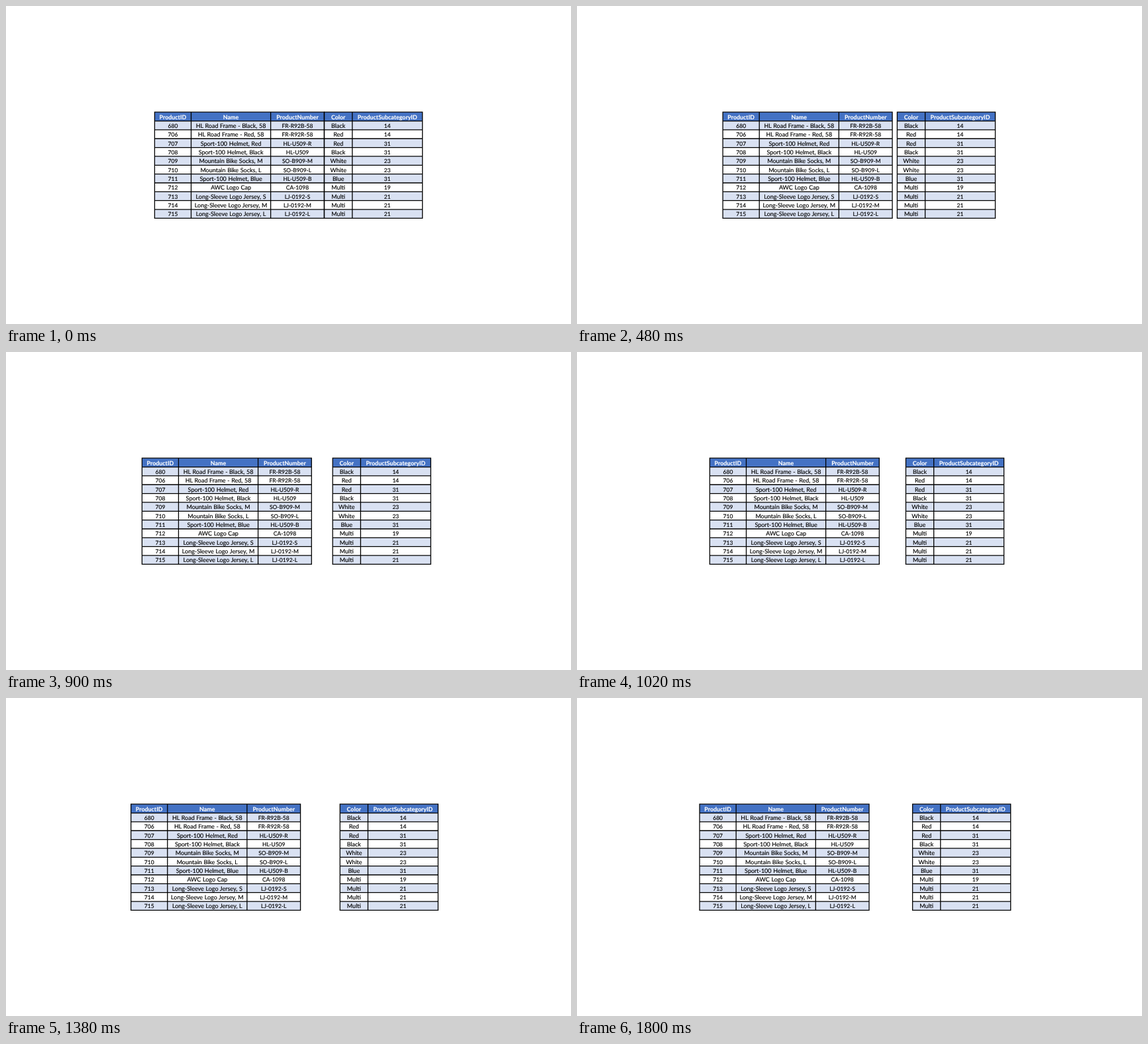
An HTML page that plays this animation: 853 px wide and 480 px high, repeating every 1.86 s.

```html
<!DOCTYPE html>
<html lang="en">
<head>
<meta charset="utf-8">
<title>Table split</title>
<style>
  html, body { margin: 0; width: 100%; height: 100%; overflow: hidden; background: #fff; }
  svg { display: block; }
  path { fill: none; stroke: #000; stroke-width: 1.3; stroke-linecap: square; }
  text {
    font: 9px Lato, Carlito, sans-serif;
    word-spacing: .3px;
    text-anchor: middle;
    text-rendering: geometricPrecision;
    fill: #000;
    stroke: #000;
    stroke-width: .15px;
  }
  .code { font-size: 8.5px; }
  .head { font-size: 8.9px; font-weight: bold; fill: #fff; stroke: #fff; }
</style>
</head>
<body>
<svg id="stage" width="853" height="480" viewBox="0 0 853 480"></svg>
<script>
const LOOP = 1860, STEP = 60, START = 30, END = 1800;
const TOP = 160.2, PITCH = 13.35, BASELINE = 10.4;

const rows = [
  'ProductID|Name|ProductNumber|Color|ProductSubcategoryID',
  '680|HL Road Frame - Black, 58|FR-R92B-58|Black|14',
  '706|HL Road Frame - Red, 58|FR-R92R-58|Red|14',
  '707|Sport-100 Helmet, Red|HL-U509-R|Red|31',
  '708|Sport-100 Helmet, Black|HL-U509|Black|31',
  '709|Mountain Bike Socks, M|SO-B909-M|White|23',
  '710|Mountain Bike Socks, L|SO-B909-L|White|23',
  '711|Sport-100 Helmet, Blue|HL-U509-B|Blue|31',
  '712|AWC Logo Cap|CA-1098|Multi|19',
  '713|Long-Sleeve Logo Jersey, S|LJ-0192-S|Multi|21',
  '714|Long-Sleeve Logo Jersey, M|LJ-0192-M|Multi|21',
  '715|Long-Sleeve Logo Jersey, L|LJ-0192-L|Multi|21'
].map(row => row.split('|'));

function add(parent, tag, attrs, text = '') {
  const node = document.createElementNS('http://www.w3.org/2000/svg', tag);
  for (const key in attrs) node.setAttribute(key, attrs[key]);
  node.textContent = text;
  return parent.appendChild(node);
}

const lineY = i => TOP + i * PITCH;

function rowFill(i) {
  if (i === 0) return '#4472c4';
  return i % 2 ? '#d9e1f2' : '#fff';
}

function textClass(i, value) {
  if (i === 0) return 'head';
  return /^\d+$|^[A-Z]{2}-/.test(value) ? 'code' : 'body';
}

function buildTable(edges, firstCol) {
  const group = add(document.getElementById('stage'), 'g', {});
  const left = edges[0], right = edges[edges.length - 1];
  const width = right - left;

  rows.forEach((row, i) =>
    add(group, 'rect', { x: left, y: lineY(i), width, height: PITCH, fill: rowFill(i) }));

  let grid = '';
  for (let i = 0; i <= rows.length; i++) grid += `M${left} ${lineY(i)}H${right}`;
  for (const x of edges) grid += `M${x} ${TOP}V${lineY(rows.length)}`;
  add(group, 'path', { d: grid });

  rows.forEach((row, i) => {
    for (let c = 0; c < edges.length - 1; c++) {
      const value = row[firstCol + c];
      add(group, 'text', {
        x: (edges[c] + edges[c + 1]) / 2,
        y: lineY(i) + BASELINE,
        class: textClass(i, value)
      }, value);
    }
  });
  return group;
}

const leftTable = buildTable([224.4, 279.5, 399.6, 480.3], 0);
const rightTable = buildTable([480.6, 522.8, 628.7], 3);

const ease = u => u * u * u * (u * (u * 6 - 15) + 10);

const shift = (group, dx) => group.setAttribute('transform', `translate(${dx} 0)`);

function draw() {
  const t = Math.floor((performance.now() % LOOP) / STEP) * STEP;
  const p = ease(Math.min(1, Math.max(0, (t - START) / (END - START))));
  shift(leftTable, -39.3 * p);
  shift(rightTable, 26 * p);
  requestAnimationFrame(draw);
}
draw();
</script>
</body>
</html>
```
